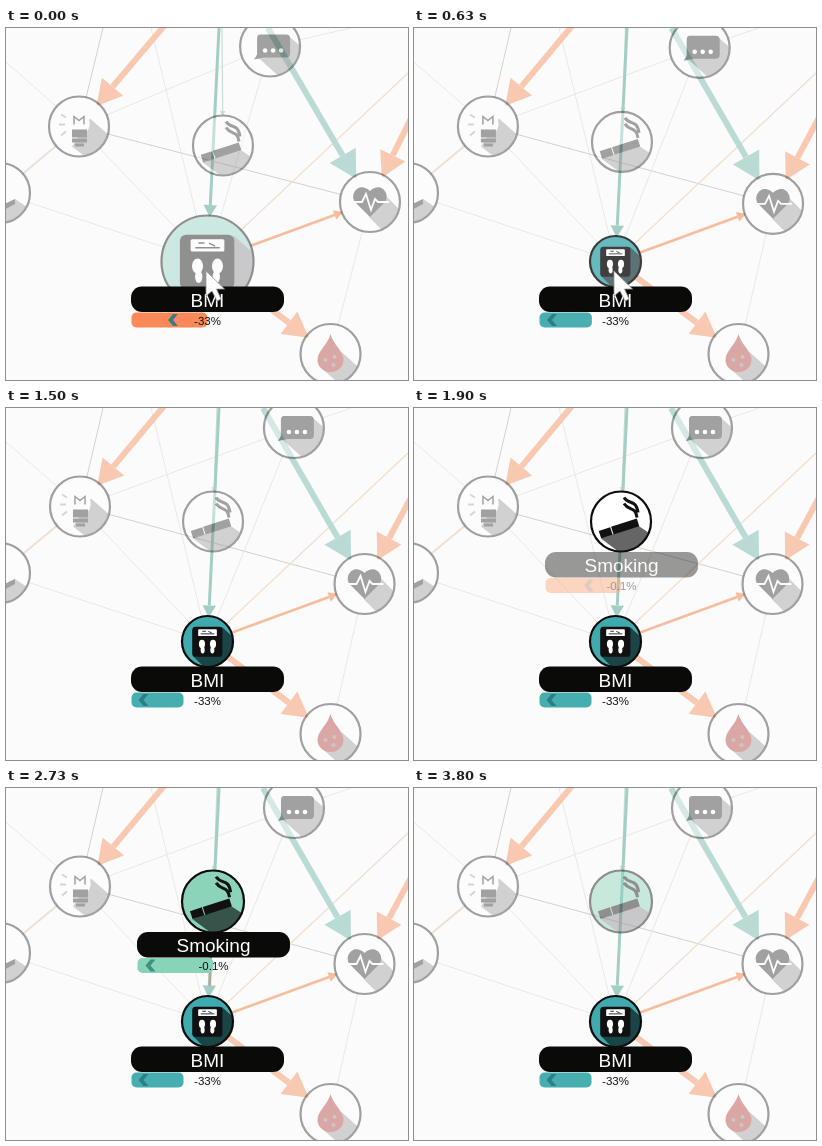
Recreate the animation shown at these times as an HTML page. Size 402 by 352 pixels, loop 3830 ms.

```html
<!DOCTYPE html>
<html lang="en">
<head>
<meta charset="utf-8">
<title>Health network</title>
<style>
  html, body { margin: 0; width: 100%; height: 100%; overflow: hidden; background: #fbfbfb; }
  svg { display: block; }
  text { font-family: "Liberation Sans", Arial, sans-serif; text-anchor: middle; }
  .name { font-size: 19px; fill: #fff; }
  .value { font-size: 11.5px; fill: #111; }
  .ring { stroke: #0c0c0c; stroke-width: 2.2; vector-effect: non-scaling-stroke; }
</style>
</head>
<body>
<svg id="stage" width="402" height="352" viewBox="0 0 402 352">
  <defs><clipPath id="disc"><circle r="29.5"/></clipPath></defs>
  <g id="links"></g>
  <g id="nodes"></g>
  <g id="labels"></g>
  <path id="cursor" transform="translate(200 243)" d="M0 0V25L6 20L11 30L15 28L10.500 18H18.500Z"
    fill="#fff" stroke="#999" stroke-width=".8"/>
</svg>
<script>
const LOOP = 3830, CLICK = 1880, GHOST = 0.38;
const INK = '#111111', SHADE = '#8e8e92';
const ORANGE = '#f8c9b0', TEAL = '#badbd5', PALE = '#e9e9e2', GREY = '#d2d2cc';

const $ = id => document.getElementById(id);
const clamp = v => Math.max(0, Math.min(1, v));
const ramp = (t, from, to) => clamp((t - from) / (to - from));
const mix = (a, b, p) => a + (b - a) * p;
const cubic = u => u < 0.5 ? 4 * u ** 3 : 1 - 4 * (1 - u) ** 3;
const ease = (t, from, to) => cubic(ramp(t, from, to));
const rgb = hex => [1, 3, 5].map(i => parseInt(hex.slice(i, i + 2), 16));
const mixColor = (a, b, p) => {
  const to = rgb(b);
  return `rgb(${rgb(a).map((v, i) => Math.round(mix(v, to[i], p)))})`;
};
function set(el, attrs) {
  for (const key in attrs) el.setAttribute(key, attrs[key]);
}
function add(parent, tag, attrs = {}, content = '') {
  const el = document.createElementNS('http://www.w3.org/2000/svg', tag);
  set(el, attrs);
  el.innerHTML = content;
  parent.append(el);
  return el;
}

// Icons sit in a disc of radius 30; each has a long shadow towards the lower right.
const foot = x => `<ellipse cx="${x}" cy="3" rx="3.6" ry="5"/><ellipse cx="${x * 0.88}" cy="10" rx="2.4" ry="4"/>`;
const icons = {
  bulb: ['M-7 20L11 -8L36 14L14 36Z', `
    <path d="M-13 -9L-18 -12M-14 -2H-20M-13 5L-18 9" stroke="#999" stroke-width="2"/>
    <path d="M-8 5C-14 -3 -9 -14 0 -14S14 -3 8 5Z" fill="#fff"/>
    <path d="M-5 -2V-10L0 -6L5 -10V-2" fill="none" stroke="${INK}" stroke-width="1.500"/>
    <path d="M-7 3H8V11H-7ZM-7 12H8V16H-7ZM-4 17H5V20H-4Z" fill="${INK}"/>`],
  smoke: ['M-20 17L17 4L38 18L8 38Z', `
    <g transform="translate(-2 7) rotate(-18)" fill="${INK}">
      <path d="M-20 -4H-8V4H-20ZM-7 -4H20V4H-7Z"/></g>
    <path d="M3 -24C8 -16 15 -23 17 -9M3 -18C8 -10 14 -16 16 -4" fill="none" stroke="${INK}" stroke-width="3"/>`],
  scale: ['M17 -17L45 8V45H10L-17 17Z', `
    <rect x="-18" y="-17.500" width="35.500" height="35.500" rx="4" fill="${INK}"/>
    <rect x="-11" y="-14.500" width="22" height="8" rx="1" fill="#fff"/>
    <path d="M-8 -9H8M-6 -12H-2M1 -12L5 -10" stroke="${INK}"/>
    <g fill="#fff">${foot(-6.5)}${foot(6.5)}</g>`],
  chat: ['M19 -10L40 8L20 40L-12 11Z', `
    <path d="M-10 -12H16Q20 -12 20 -8V7Q20 11 16 11H-6L-16 13L-13 8V-8Q-13 -12 -10 -12Z" fill="${INK}"/>
    <g fill="#fff"><circle cx="-5" cy="4" r="2.300"/><circle cx="3" cy="4" r="2.300"/><circle cx="11" cy="4" r="2.300"/></g>`],
  heart: ['M16 -6L38 16L20 36L-1 15Z', `
    <path d="M0 15L-15 0C-21 -9 -10 -21 0 -11C10 -21 21 -9 15 0Z" fill="${INK}"/>
    <path d="M-19 0H-8L-4 -8L1 8L5 -3L8 0H19" fill="none" stroke="#fff" stroke-width="1.800"/>`],
  drop: ['M11 -2L38 22L18 38L-8 15Z', `
    <path d="M0 -20C3 -9 13 -3 13 6A13 12 0 0 1 -13 6C-13 -3 -3 -9 0 -20Z" fill="#a8201c"/>
    <g fill="#777"><circle cx="-5" cy="6" r="2"/><circle cx="4" cy="3" r="2"/><circle cx="3" cy="11" r="2"/></g>`],
  edge: ['M2 15L15 6L36 20L16 40L-6 26Z', `<path d="M2 12L15 6V11L2 18Z" fill="${INK}"/>`]
};

// dx, dy: displacement at the start, which settles to zero.
const nodes = {
  side: { x: -6, y: 165, dx: 0, dy: 0, icon: 'edge' },
  bulb: { x: 74, y: 98.5, dx: -1, dy: 0, icon: 'bulb' },
  chat: { x: 288, y: 20, dx: -24, dy: -1.5, icon: 'chat' },
  heart: { x: 358.5, y: 176, dx: 5.5, dy: -2, icon: 'heart' },
  drop: { x: 324.5, y: 326, dx: 0, dy: 0, icon: 'drop' },
  smoke: { x: 207, y: 113.5, dx: 10, dy: 4, icon: 'smoke' },
  bmi: { x: 201.5, y: 233.5, dx: 0, dy: 0, icon: 'scale' }
};
for (const n of Object.values(nodes)) {
  const [shade, art] = icons[n.icon];
  n.r = 30;
  n.el = add($('nodes'), 'g', { opacity: GHOST });
  n.disc = add(n.el, 'circle', { r: 30, fill: '#ffffff' });
  n.shade = add(n.el, 'path', { d: shade, fill: SHADE, 'clip-path': 'url(#disc)' });
  add(n.el, 'g', {}, art);
  add(n.el, 'circle', { r: 30, fill: 'none', class: 'ring' });
}

// Each link: from, to, colour, width, head length. Ends are node names or [x, y, dx].
const links = [
  [[0, 34], 'bulb', PALE, 1, 0],
  [[97, 0], 'bulb', GREY, 1, 0],
  ['side', 'bulb', '#f0e0d2', 2, 0],
  [[145, 0], 'bmi', PALE, 1, 0],
  ['bulb', 'bmi', PALE, 1, 0],
  ['side', 'bmi', PALE, 1, 0],
  ['bulb', 'heart', GREY, 1, 0],
  ['bulb', 'chat', PALE, 1, 0],
  ['chat', 'bmi', PALE, 1, 0],
  [[402, 45], 'bmi', '#f3e0cc', 1.3, 0],
  ['heart', 'drop', PALE, 1, 0],
  ['chat', [345, 0], PALE, 1, 0],
  [[211, 0, 5], 'smoke', '#c8ddd6', 1.2, 5],
  [[158, -2], 'bulb', ORANGE, 6, 25],
  [[257, 0, 5], 'heart', TEAL, 6, 27],
  [[409, 82], 'heart', ORANGE, 6, 25],
  ['bmi', 'heart', '#f7bd9c', 2.6, 9],
  ['bmi', 'drop', ORANGE, 6, 25],
  [[213, 0], 'bmi', '#a3cec5', 3, 12]
].map(([from, to, color, width, head]) => ({
  from, to, width, head,
  line: add($('links'), 'path', { stroke: color, 'stroke-width': width }),
  tip: add($('links'), 'path', { fill: color })
}));
const effect = add($('links'), 'path', { d: 'M205.500 143L203.800 198', 'stroke-width': 2.4 });

function place(end, k) {
  if (Array.isArray(end)) return { x: end[0] + (end[2] || 0) * k, y: end[1], r: 0 };
  const n = nodes[end];
  return { x: n.x + n.dx * k, y: n.y + n.dy * k, r: n.r };
}
function drawLink(link, k) {
  const a = place(link.from, k), b = place(link.to, k);
  const len = Math.hypot(b.x - a.x, b.y - a.y);
  const ux = (b.x - a.x) / len, uy = (b.y - a.y) / len;
  const reach = b.r - (link.head ? link.width / 2 : 0);
  const tx = b.x - ux * reach, ty = b.y - uy * reach;
  const bx = tx - ux * link.head, by = ty - uy * link.head;
  const h = link.head * 0.56;
  set(link.line, { d: `M${a.x + ux * a.r} ${a.y + uy * a.r}L${bx} ${by}` });
  if (h) set(link.tip, { d: `M${tx} ${ty}L${bx - uy * h} ${by + ux * h}L${bx + uy * h} ${by - ux * h}Z` });
}

function makeLabel(x, y, name, value) {
  const el = add($('labels'), 'g', { transform: `translate(${x} ${y})` });
  const bar = add(el, 'rect', { x: 0.5, y: 26, height: 15, rx: 5 });
  const chevron = add(el, 'path', { d: 'M5 -6L0 0L5 6H0L-5 0L0 -6Z' });
  add(el, 'rect', { width: 153, height: 25.5, rx: 11, fill: '#0a0a08' });
  add(el, 'text', { x: 76.5, y: 20, class: 'name' }, name);
  add(el, 'text', { x: 76.5, y: 38, class: 'value' }, value);
  return { el, bar, chevron };
}
const bmiLabel = makeLabel(125, 258.5, 'BMI', '-33%');
const smokeLabel = makeLabel(131, 144, 'Smoking', '-0.1%');

function drawBar(label, width, mark, fill, markFill) {
  set(label.bar, { width, fill });
  set(label.chevron, { transform: `translate(${mark} 33.5)`, fill: markFill });
}
function drawNode(n, k, opacity, fill, lit) {
  const p = { x: n.x + n.dx * k, y: n.y + n.dy * k };
  set(n.el, { transform: `translate(${p.x} ${p.y}) scale(${n.r / 30})`, opacity });
  set(n.disc, { fill });
  set(n.shade, { fill: mixColor(SHADE, '#000000', lit), 'fill-opacity': mix(1, 0.6, lit) });
}

function render(t) {
  const k = Math.exp(-t / 270);
  const leave = ease(t, 3430, 3800);
  const hover = ramp(t, 1620, 1850) * (1 - leave);
  const p = ease(t, 0, 750);
  const q = ease(t, CLICK, CLICK + 750);
  const focus = ramp(t, 250, 850);
  const tint = ease(t, CLICK, CLICK + 400);

  nodes.bmi.r = mix(46, 25.5, ease(t, 0, 350));
  nodes.smoke.r = 30 + tint;

  for (const n of Object.values(nodes)) drawNode(n, k, GHOST, '#ffffff', 0);
  drawNode(nodes.bmi, k, mix(0.45, 1, focus), mixColor('#94d2c4', '#40abae', ease(t, 0, 500)), focus);
  drawNode(nodes.smoke, k, mix(GHOST + 0.08 * tint, 1, hover), mixColor('#ffffff', '#8bd4b9', tint), hover);
  links.forEach(link => drawLink(link, k));

  set(effect, {
    stroke: mixColor('#e87850', '#a9b8b0', ramp(t, 2200, 3000)),
    opacity: tint * hover
  });

  drawBar(bmiLabel, mix(76, 52, p), mix(42, 12.5, p),
    mixColor('#fb8a58', '#47aeb0', p), mixColor('#3d7c80', '#2b8088', p));
  drawBar(smokeLabel, 76, mix(44, 13.5, q),
    mixColor('#ffa070', '#87d4b8', q), mixColor('#b98a68', '#3f9080', q));
  set(smokeLabel.el, { opacity: ramp(t, 1770, 2090) * (1 - leave) });
  set($('cursor'), { visibility: t < 1300 ? 'visible' : 'hidden' });
}

const start = performance.now();
function tick() {
  render((performance.now() - start) % LOOP);
  requestAnimationFrame(tick);
}
tick();
</script>
</body>
</html>
```
